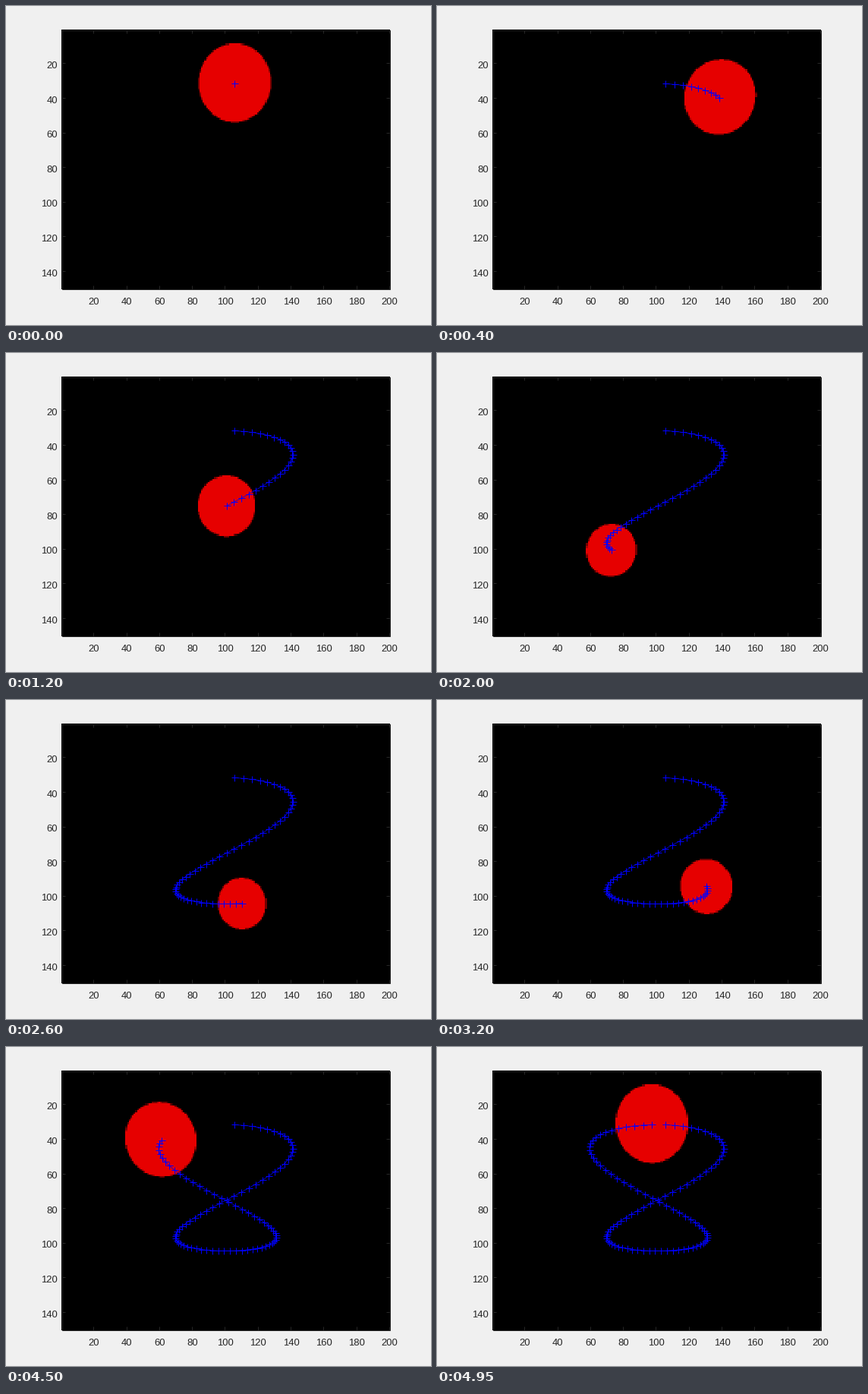
Recreate the animation shown at these times as a matplotlib script. Size 560x420 px, loop 5 s.

```python
import numpy as np
import matplotlib.pyplot as plt
from matplotlib.animation import FuncAnimation

W, H, DPI = 560, 420, 100
PT = 72 / DPI                                  # points per pixel
LEFT, RIGHT, TOP, BOTTOM = 73, 506, 31, 373    # plot box in pixels
COLS, ROWS = 200, 150
FRAMES, INTERVAL, STEP = 100, 50, 1 / 16

FOCAL, CX, CY, RADIUS = 175, 100.5, 75.5, 0.5
RED = np.array([230, 0, 0]) / 255
INK = (38 / 255,) * 3
SUB = 2                                        # samples per image pixel and axis

plt.rcParams["font.family"] = "Liberation Sans"


def to_px(u, v):
    """Image coordinates (1-based pixel centres) to stage pixels."""
    return (LEFT + (u - 0.5) * (RIGHT - LEFT) / COLS,
            TOP + (v - 0.5) * (BOTTOM - TOP) / ROWS)


def ball_at(t):
    """Position of the ball in camera space: a tilted figure of eight."""
    return np.array([np.sin(2 * t), -np.cos(t), 5 - np.cos(t)])


def project(p):
    return CX + FOCAL * p[0] / p[2], CY + FOCAL * p[1] / p[2]


# Viewing rays through every sample of the image
us = (np.arange(COLS * SUB) + 0.5) / SUB + 0.5
vs = (np.arange(ROWS * SUB) + 0.5) / SUB + 0.5
ray_x, ray_y = np.meshgrid((us - CX) / FOCAL, (vs - CY) / FOCAL)
ray_sq = ray_x ** 2 + ray_y ** 2 + 1


def render(p):
    """Flat-coloured view of the ball as an RGB image."""
    along = ray_x * p[0] + ray_y * p[1] + p[2]
    hit = along ** 2 >= ray_sq * (p @ p - RADIUS ** 2)
    cover = hit.reshape(ROWS, SUB, COLS, SUB).mean(axis=(1, 3))
    return cover[..., None] * RED


times = (np.arange(FRAMES) + 1) * STEP
balls = [ball_at(t) for t in times]
path_x, path_y = to_px(*np.array([project(p) for p in balls]).T)

fig = plt.figure(figsize=(W / DPI, H / DPI), dpi=DPI, facecolor=(240 / 255,) * 3)
ax = fig.add_axes([0, 0, 1, 1])
ax.axis("off")

image = ax.imshow(render(balls[0]), extent=(LEFT, RIGHT, BOTTOM, TOP),
                  interpolation="nearest", aspect="auto", zorder=1)
ax.set(xlim=(0, W), ylim=(H, 0))


def stroke(xs, ys):
    ax.plot(xs, ys, color=INK, lw=PT, zorder=2, solid_capstyle="butt",
            solid_joinstyle="miter")


def label(x, y, value, align):
    ax.text(x, y, str(value), size=13 * PT, color=INK, ha=align, va="baseline")


x0, x1, y0, y1 = LEFT + 0.5, RIGHT - 0.5, TOP + 0.5, BOTTOM - 0.5
stroke([x0, x1, x1, x0, x0], [y0, y0, y1, y1, y0])

TICK = 4.3
for value in range(20, COLS + 1, 20):
    x, _ = to_px(value, 0)
    stroke([x, x], [y0, y0 + TICK])
    stroke([x, x], [y1, y1 - TICK])
    label(x + 0.4, 393, value, "center")
for value in range(20, ROWS, 20):
    _, y = to_px(0, value)
    stroke([x0, x0 + TICK], [y, y])
    stroke([x1, x1 - TICK], [y, y])
    label(68, y + 6.5, value, "right")

trail, = ax.plot([], [], color="#0000ff", lw=0.7 * PT, marker="+",
                 ms=9 * PT, mew=PT, zorder=3)


def update(i):
    image.set_data(render(balls[i]))
    trail.set_data(path_x[:i + 1], path_y[:i + 1])
    return image, trail


anim = FuncAnimation(fig, update, frames=FRAMES, interval=INTERVAL,
                     repeat=True, repeat_delay=0)
plt.show()
```
